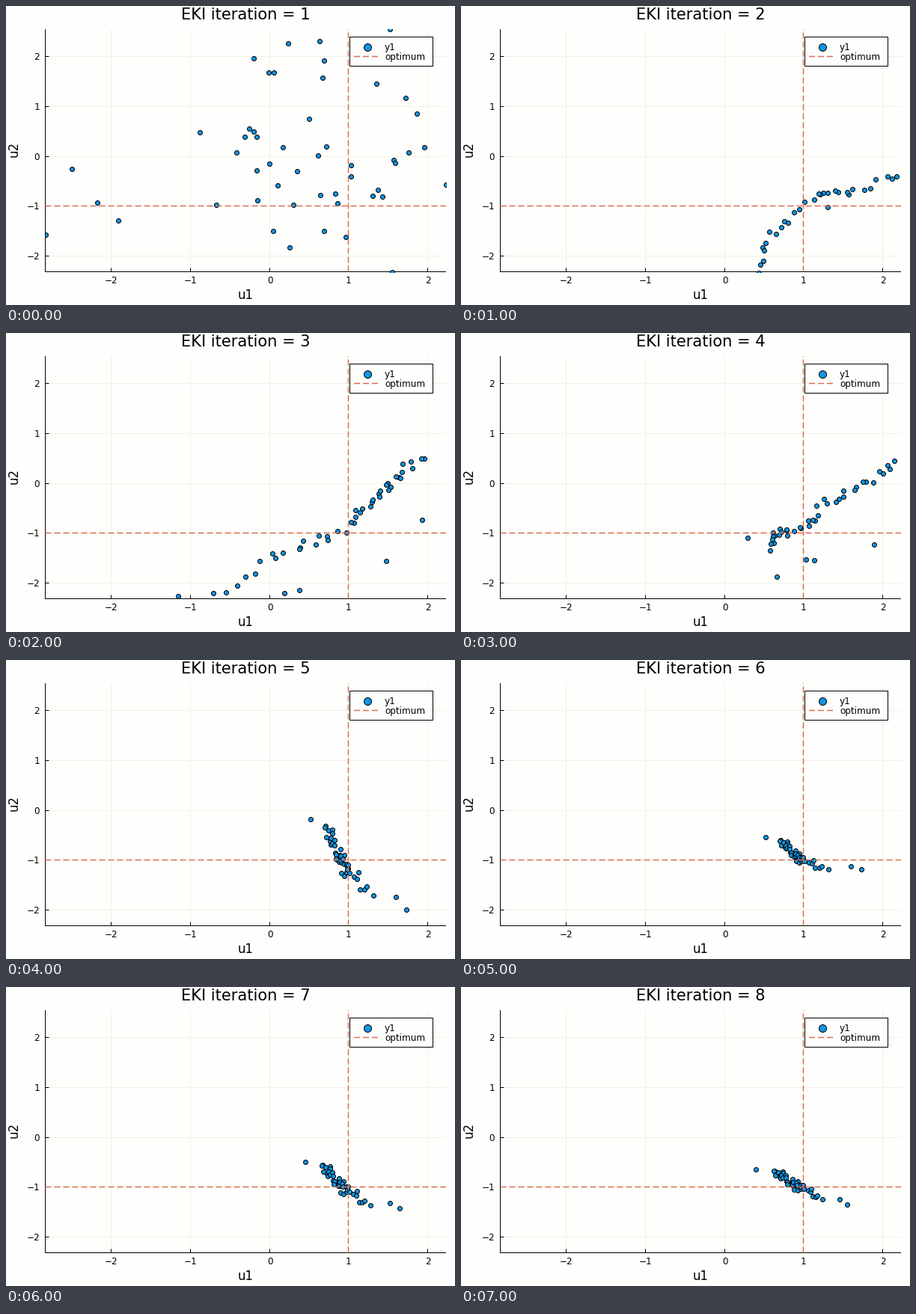
Animation of 600 by 400 pixels, one loop 8 s. Source, as a matplotlib script:

```python
import math

import numpy as np
import matplotlib.pyplot as plt
from matplotlib.animation import FuncAnimation
from matplotlib.patches import Rectangle

PX = 0.72  # points per pixel at 100 dpi
PAPER, INK, GRID = "#fefefc", "#000000", "#f1f1e6"
BLUE, ORANGE = "#0f96e4", "#da6c55"
LEFT, RIGHT, TOP, BOTTOM = 52.5, 588, 31, 355.5
rng = np.random.default_rng(12)


def px(u):
    return 352 + 105.9 * u


def py(v):
    return 201 - 66.8 * v


def prior(n):
    """Normal sample scaled so that its extremes touch the plot's edges."""
    p = rng.normal(size=(n, 2))
    p = (p - p.min(0)) / np.ptp(p, axis=0)
    return [LEFT, TOP] + p * [RIGHT - LEFT, BOTTOM - TOP]


def trail(keys, n, spread, loners):
    """Members strung along a few key points, with jitter and some outliers."""
    keys = np.array(keys, float)
    t = np.linspace(0, len(keys) - 1, n)
    path = np.column_stack([np.interp(t, range(len(keys)), k) for k in keys.T])
    return np.vstack([path + rng.normal(0, spread, path.shape), loners])


def bend(cloud, mid, stretch, curve=0.0):
    """Stretch a cloud vertically and bend its right side down."""
    x, y = cloud.T
    tail = np.clip(x - 447, 0, None)
    return np.column_stack([x, mid + stretch * (y - 260) + curve * tail**2])


def drift(cloud, k):
    """Pull members left and down in proportion to their distance from the optimum."""
    return cloud + k * np.abs(cloud[:, :1] - 460) * [-0.25, 0.14]


second = trail([(582, 224), (540, 244), (499, 247), (473, 258), (434, 286),
                (407, 316), (394, 349)], 30, 3.5, [(489.5, 268.5)])
third = trail([(558, 168), (525, 190), (505, 210), (483, 232), (461, 254),
               (410, 280), (353, 302), (285, 353)], 43, 4,
              [(508, 305), (556, 250), (392, 344), (372, 348), (230, 352)])
fourth = trail([(580, 171), (545, 200), (500, 220), (473, 247), (440, 266),
                (420, 268), (411, 284)], 38, 4,
               [(383, 274), (552, 283), (461, 303), (472, 304), (422, 326)])
sixth = trail([(428, 241), (433, 251), (440, 255), (446, 260), (453, 264),
               (458, 268), (486, 279)], 44, 2.5,
              [(407, 237), (521, 275.5), (535, 280)])
clouds = [prior(50), second, third, fourth, bend(sixth, 264, 2.2, 0.0034),
          sixth, bend(drift(sixth, 0.5), 261, 1.4), drift(sixth, 1)]

plt.rcParams["font.family"] = "DejaVu Sans"
fig = plt.figure(figsize=(6, 4), dpi=100, facecolor=PAPER)
ax = fig.add_axes([0, 0, 1, 1])
ax.set(xlim=(0, 600), ylim=(400, 0))
ax.axis("off")


def line(x0, y0, x1, y1, color=INK, width=1.0, z=2, **kw):
    ax.plot([x0, x1], [y0, y1], color=color, lw=width * PX, zorder=z, snap=False,
            solid_capstyle="butt", dash_capstyle="butt", **kw)


def dashed(x0, y0, x1, y1, z):
    line(x0, y0, x1, y1, ORANGE, 1.5, z, dashes=(8 / 1.5, 4 / 1.5))


def label(x, y, text, size, ha="center", va="baseline", **kw):
    text = str(text).replace("-", "\u2212")
    return ax.text(x, y, text, fontsize=size * PX, color=INK,
                   ha=ha, va=va, zorder=9, **kw)


def circles(xy, size, z):
    x, y = np.transpose(xy)
    return ax.scatter(x, y, s=(size * PX) ** 2, c=BLUE, edgecolors=INK,
                      linewidths=PX, zorder=z)


# Grid, ticks and axes
for n in range(-2, 3):
    x, y = math.floor(px(n)) + 0.5, math.floor(py(n)) + 0.5
    line(x, TOP, x, BOTTOM, GRID, z=1)
    line(LEFT, y, RIGHT, y, GRID, z=1)
    line(x, BOTTOM, x, BOTTOM - 5)
    line(LEFT, y, LEFT + 5, y)
    label(x, 371, n, 12)
    label(45, py(n) + 4.5, n, 12, ha="right")
line(LEFT, TOP, LEFT, BOTTOM + 0.5)
line(LEFT - 0.5, BOTTOM, RIGHT, BOTTOM)
label(320, 392, "u1", 16.5)
label(10.5, 191.5, "u2", 16.5, va="center", rotation=90)
title = label(320, 18, "", 21)

# Members and the optimum cross
dots = circles(clouds[0], 6, 4)
dots.set_clip_path(Rectangle((LEFT, TOP), RIGHT - LEFT, BOTTOM - TOP,
                             transform=ax.transData))
dashed(LEFT, 267.5, RIGHT, 267.5, 5)
dashed(457.5, BOTTOM, 457.5, TOP, 5)

# Legend
ax.add_patch(Rectangle((459.5, 41.5), 111, 39, fc=PAPER, ec=INK, lw=PX,
                       snap=False, zorder=6))
circles([(483, 54.5)], 10, 7)
dashed(465, 67.5, 501, 67.5, 7)
label(506, 59, "y1", 12, ha="left")
label(506, 72, "optimum", 12, ha="left")


def draw(i):
    dots.set_offsets(clouds[i])
    title.set_text(f"EKI iteration = {i + 1}")
    return dots, title


anim = FuncAnimation(fig, draw, frames=len(clouds), interval=1000,
                     repeat=True, repeat_delay=0)
plt.show()
```
